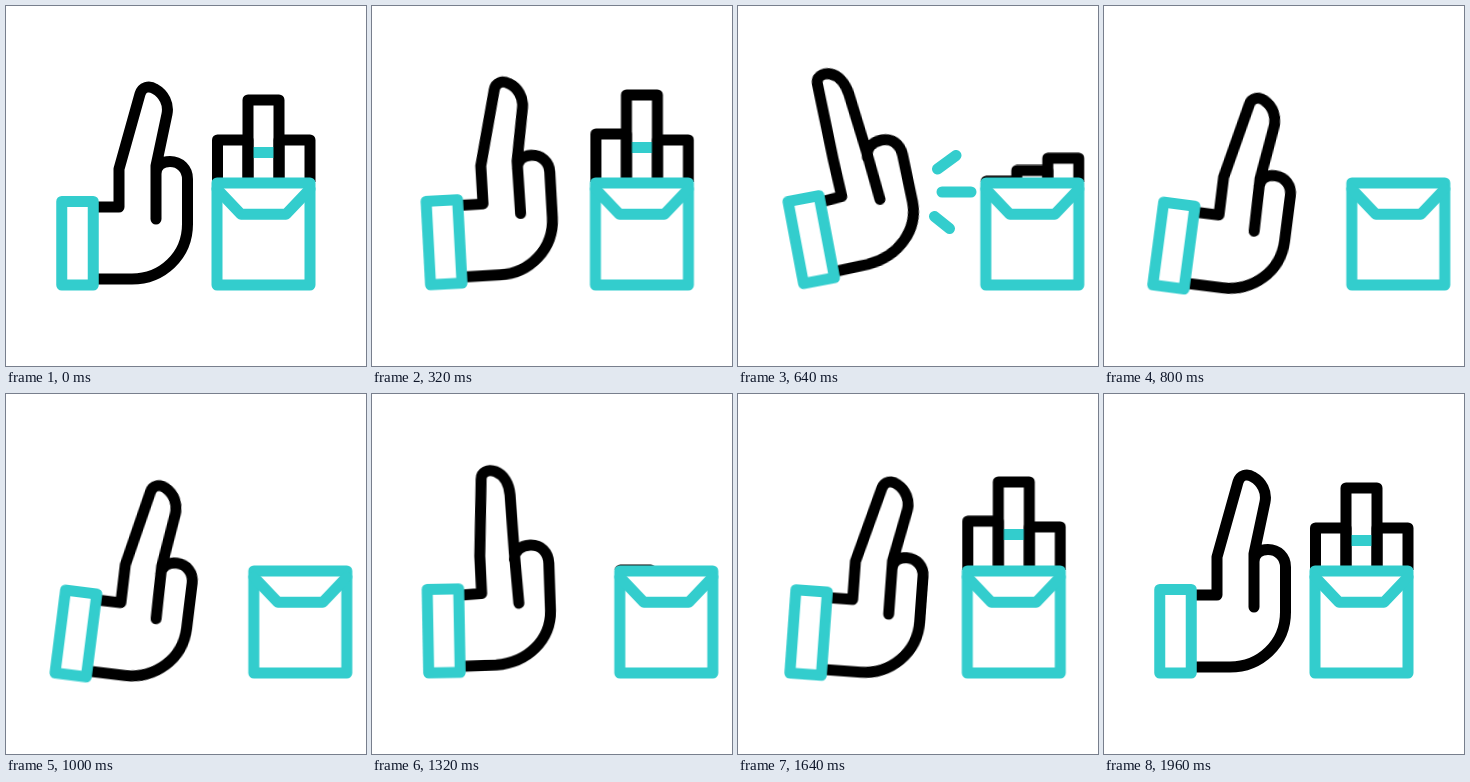
Recreate the animation shown at these times as an HTML page. Size 360 px wide and 360 px high, loop 2 s.

```html
<!DOCTYPE html>
<html lang="en">
<head>
<meta charset="utf-8">
<title>Refusing cigarettes</title>
<style>
  html, body { margin: 0; width: 100%; height: 100%; overflow: hidden; background: #fff; }
  svg { display: block; width: 100vw; height: 100vh; }
  path, rect { fill: none; stroke: #000; stroke-width: 11; stroke-linecap: round; stroke-linejoin: round; }
  .teal { stroke: #33cdcd; }
  .box { fill: #fff; }

  .hand, .palm, .pack, .cig, .spark { animation: 2s ease-in-out infinite; }
  .hand { animation-name: wave; transform-origin: 53px 226px; }
  .palm { animation-name: bend; }
  .pack { animation-name: slide; }
  .left { animation-name: left; }
  .middle { animation-name: middle; }
  .right { animation-name: right; }
  .spark { animation-name: spark; stroke-dasharray: 1 2; }

  @keyframes wave {
    0% { transform: rotate(0deg); }
    10% { transform: rotate(0deg); animation-timing-function: ease-in; }
    16% { transform: rotate(-3deg); animation-timing-function: ease-out; }
    31% { transform: rotate(-11deg); }
    44.75% { transform: rotate(13.5deg); }
    59.75% { transform: rotate(-10.5deg); }
    72.75% { transform: rotate(9.5deg); animation-timing-function: ease-in; }
    82% { transform: rotate(4.2deg); animation-timing-function: ease-out; }
    97%, 100% { transform: rotate(0deg); }
  }

  /* fingers: leaning forward, then straight */
  @keyframes bend {
    0%, 10%, 44%, 75.5%, 100% {
      d: path("M90 201 L113 201 L113 163 L134 88 C136 81 143 79 149 83 C158 88 163 98 161 108 L150 160 L150 213 M150 168 C150 159 156 155.5 164 155.5 C174 155.5 181.5 163 181.5 173 L181.5 218 C181.5 250 156 273 126 273 L90 273");
    }
    32%, 62% {
      d: path("M90 202 L109.5 200.5 L108 163 L106.5 86 C106 79 113 75 121 78 C129 81 134 90 135.5 101 L142 160 L146.5 210.5 M142 167 C142 159 148 153 158.5 152.5 C169.5 152 176.5 160 177 171 L178 219 C178 248 154 270 123 272 L90 273");
    }
  }

  @keyframes slide {
    0%, 10%, 97%, 100% { transform: translateX(0); }
    25%, 67% { transform: translateX(36.8px); }
  }

  @keyframes left {
    0%, 10%, 92%, 100% { transform: translateY(0); }
    16% { transform: translateY(-6px); animation-timing-function: ease-in; }
    32% { transform: translateY(41px); animation-timing-function: ease-out; }
    35%, 64% { transform: translateY(48px); animation-timing-function: ease-in; }
    66% { transform: translateY(42.5px); animation-timing-function: ease-out; }
    81% { transform: translateY(-7px); }
  }
  @keyframes middle {
    0%, 10%, 94%, 100% { transform: translateY(0); }
    16% { transform: translateY(-5px); animation-timing-function: ease-in; }
    32% { transform: translateY(70px); animation-timing-function: ease-out; }
    36%, 66% { transform: translateY(92px); }
    82% { transform: translateY(-6px); }
  }
  @keyframes right {
    0%, 16%, 96%, 100% { transform: translateY(0); }
    22% { transform: translateY(-6px); animation-timing-function: ease-in; }
    32% { transform: translateY(18px); animation-timing-function: linear; }
    38%, 70% { transform: translateY(48px); }
    82% { transform: translateY(-1px); animation-timing-function: ease-out; }
    87% { transform: translateY(-6px); }
  }

  @keyframes spark {
    0%, 25.9% { opacity: 0; stroke-dashoffset: 1; }
    26% { opacity: 1; stroke-dashoffset: 1; }
    31%, 33% { opacity: 1; stroke-dashoffset: 0; }
    38% { opacity: 1; stroke-dashoffset: -1; }
    38.1% { opacity: 0; stroke-dashoffset: -1; }
    38.2%, 53.9% { opacity: 0; stroke-dashoffset: 1; }
    54% { opacity: 1; stroke-dashoffset: 1; }
    59%, 61% { opacity: 1; stroke-dashoffset: 0; }
    65% { opacity: 1; stroke-dashoffset: -1; }
    65.1%, 100% { opacity: 0; stroke-dashoffset: -1; }
  }
</style>
</head>
<body>
<svg viewBox="0 0 360 360">
  <clipPath id="above"><rect width="360" height="176"/></clipPath>

  <g class="pack">
    <g clip-path="url(#above)">
      <path class="cig left" d="M211.5 230 V134 H242 V230"/>
      <path class="cig right" d="M273 230 V134 H304 V230"/>
      <g class="cig middle">
        <path class="teal" d="M247 146.5 H268"/>
        <path d="M242 190 V94 H273 V190"/>
      </g>
    </g>
    <rect class="teal box" x="211" y="177" width="93" height="102"/>
    <path class="teal" d="M211 183 L235 208.3 H280 L304 183"/>
  </g>

  <path class="teal spark" pathLength="1" d="M199.5 163 L218 149.5"/>
  <path class="teal spark" pathLength="1" d="M204 186 H233"/>
  <path class="teal spark" pathLength="1" d="M196.5 210.5 L211.5 222.5"/>

  <g class="hand">
    <path class="palm"/>
    <rect class="teal box" x="55.75" y="195.5" width="31.5" height="83.5"/>
  </g>
</svg>
</body>
</html>
```
